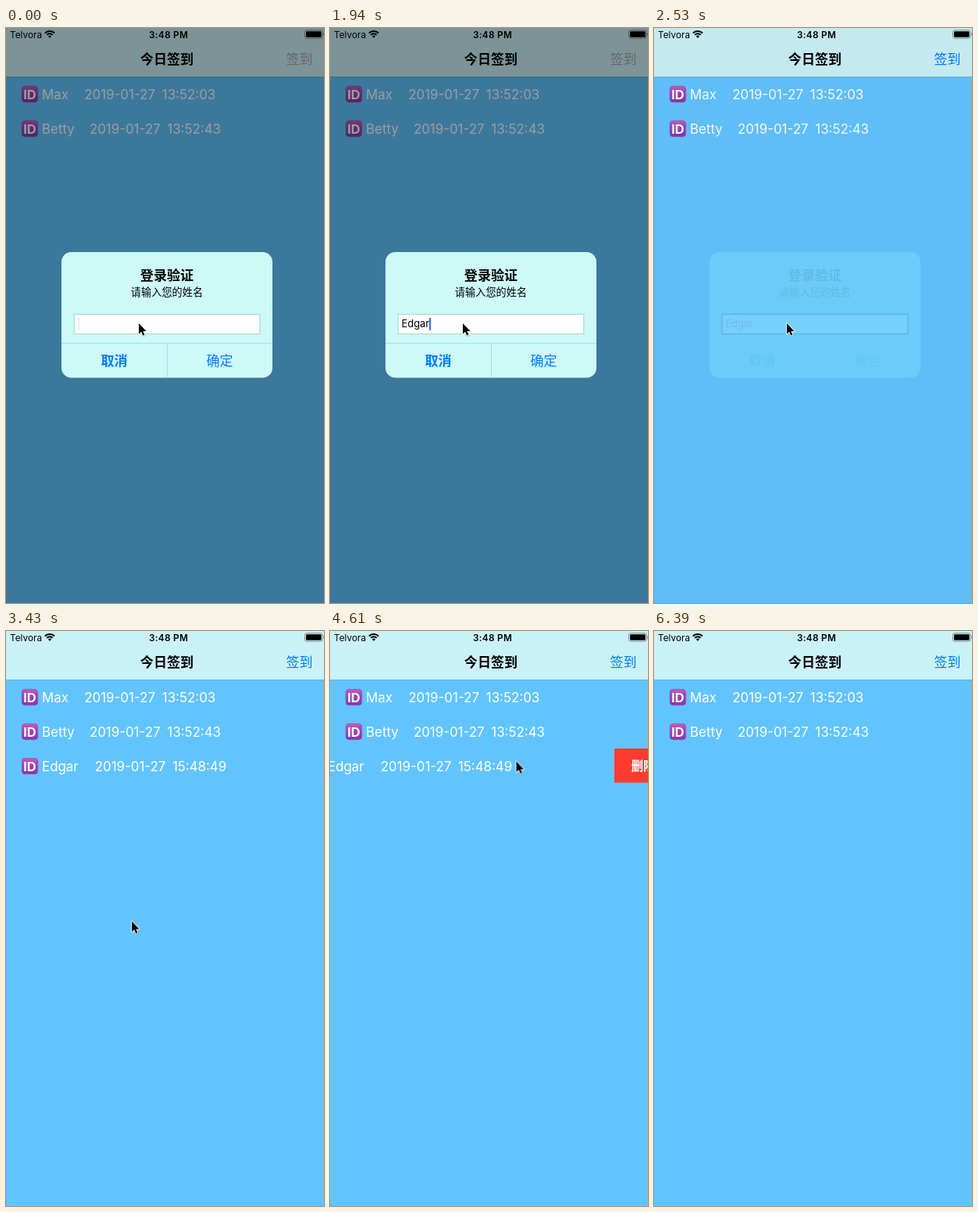
Recreate the animation shown at these times as an HTML page. Size 407x734 px, loop 7560 ms.

```html
<!DOCTYPE html>
<html lang="zh-CN">
<head>
<meta charset="utf-8">
<title>今日签到</title>
<style>
  html, body { margin: 0; width: 100%; height: 100%; overflow: hidden; background: #62c4ff; }
  .stage { position: relative; width: 407px; height: 734px; overflow: hidden; }
  .stage > * { position: absolute; left: 0; top: 0; }
  svg { display: block; width: 407px; height: 734px; }
  text { font: 400 17px Inter, "Noto Sans CJK SC", sans-serif; }
  .bold { font-weight: 600; }
  .mid { text-anchor: middle; }
  .cjk { font-family: "Noto Sans CJK SC", sans-serif; letter-spacing: .1px; }
  .rows text { font-size: 16.9px; fill: #fff; }
  .status { font-size: 11.8px; }
  .tag { font-size: 16.5px; font-weight: 700; fill: #fff; }
  .rows .del { font-size: 15.5px; font-weight: 600; letter-spacing: 0; }

  .anim { animation: 7560ms step-end infinite; }
  .sign { animation-name: sign; }
  .dim { width: 407px; height: 734px; background: #000; animation-name: dim; }
  .card { animation-name: card; }
  .body { animation-name: body; }
  .frame { animation-name: frame; }
  .entry { animation-name: entry; }
  .slide { animation-name: slide; }
  .button { animation-name: button; }
  .mouse { animation-name: mouse; }

  .field {
    left: 91.5px; top: 365px; height: 26px;
    display: flex; align-items: center;
    font: 12.9px/16px Inter, sans-serif; color: #000;
    animation-name: body;
  }
  .field span { font-size: 0; animation: type 7560ms step-end infinite; animation-delay: var(--at); }
  .caret { width: 2px; height: 16px; background: #4268f0; animation-name: caret; }

  @keyframes type { 0% { font-size: 12.9px } 50%, 100% { font-size: 0 } }
  @keyframes caret {
    0% { opacity: .1 } 1.851% { opacity: 0 } 5.82% { opacity: 1 } 31.481%, 100% { opacity: 0 }
  }
  @keyframes sign { 0% { fill: #a8a8a8 } 31.481%, 100% { fill: #007aff } }
  @keyframes dim {
    0% { opacity: .39 } 31.481% { opacity: .32 } 33.465% { opacity: .03 } 35.449%, 100% { opacity: 0 }
  }
  @keyframes card {
    0% { fill: #cdf9f7 } 31.481% { fill: #b5fbf8 } 33.465% { fill: #6ccbf9 } 35.449%, 100% { fill: transparent }
  }
  @keyframes body {
    0% { opacity: 1 } 31.481% { opacity: .85 } 33.465% { opacity: .08 } 35.449%, 100% { opacity: 0 }
  }
  @keyframes frame {
    0% { stroke: #a3cfd2 } 31.481% { stroke: #92d3dc } 33.465% { stroke: #50b0e8 } 35.449%, 100% { stroke: transparent }
  }
  @keyframes entry {
    0% { opacity: 0 } 39.417% { opacity: .5 } 41.402% { opacity: 1 }
    70.767% { opacity: .6 } 72.751% { opacity: .12 } 74.735%, 100% { opacity: 0 }
  }
  @keyframes slide {
    0% { transform: none } 60.978% { transform: translateX(-49px) } 62.962%, 100% { transform: translateX(-73px) }
  }
  @keyframes button {
    0% { transform: translateX(407px) } 60.978% { transform: translateX(364px) }
    62.962%, 100% { transform: translateX(334px) }
  }
  @keyframes mouse {
    0% { transform: translate(170px, 377px) }
    45.37% { transform: translate(161px, 370.5px) }
    47.222% { transform: translate(168px, 350px) }
    49.206% { transform: translate(190px, 308px) }
    51.19% { transform: translate(222px, 258px) }
    53.174% { transform: translate(258px, 214px) }
    55.158% { transform: translate(290px, 185px) }
    57.01% { transform: translate(312px, 170px) }
    58.994% { transform: translate(319px, 167px) }
    60.978% { transform: translate(238.5px, 166.5px) }
    62.962% { transform: translate(220px, 167px) }
    64.946% { transform: translate(272px, 170px) }
    66.931% { transform: translate(342px, 174px) }
    68.915% { transform: translate(376px, 175px) }
    82.539% { transform: translate(390px, 260px) }
    84.523%, 100% { transform: translate(420px, 300px) }
  }
</style>
</head>
<body>
<div class="stage">
  <svg viewBox="0 0 407 734">
    <defs>
      <linearGradient id="violet" x2="0" y2="1">
        <stop stop-color="#c45fbe"/><stop offset=".35" stop-color="#a544b4"/><stop offset="1" stop-color="#8438aa"/>
      </linearGradient>
      <g id="badge">
        <rect x="20.3" y="74.3" width="20.4" height="20.4" rx="4" fill="url(#violet)" stroke="#8a4cab" stroke-width=".6"/>
        <text class="tag mid" x="30.5" y="90.5">ID</text>
      </g>
    </defs>
    <rect width="407" height="734" fill="#62c4ff"/>
    <rect width="407" height="62" fill="#caf1f7"/>
    <rect y="62" width="407" height="1" fill="#6fb0cc"/>

    <text class="status" x="5" y="12.5">Telvora</text>
    <g fill="none" stroke="#000" stroke-width="2">
      <path d="M49.9 6.5a8.6 8.6 0 0 1 12.2 0M52.3 8.9a5.2 5.2 0 0 1 7.4 0"/>
      <path d="M56 12.8l-2.1-2.1a2.9 2.9 0 0 1 4.2 0z" fill="#000" stroke="none"/>
    </g>
    <text class="status bold mid" x="208" y="12.5" letter-spacing=".3">3:48 PM</text>
    <rect x="382.5" y="2.8" width="22.6" height="10.4" rx="2.6" fill="none" stroke="#000" stroke-opacity=".45" stroke-width=".9"/>
    <rect x="384" y="4.2" width="19.6" height="7.6" rx="1.4"/>
    <path d="M406 6.2q1.5 1.8 0 3.6z" fill-opacity=".5"/>

    <text class="cjk bold mid" x="206" y="46.3">今日签到</text>
    <text class="cjk mid sign anim" x="375.5" y="46.3">签到</text>

    <g class="rows">
      <use href="#badge"/>
      <text x="46" y="90.5">Max</text>
      <text x="100.3" y="90.5">2019-01-27</text>
      <text x="199.8" y="90.5">13:52:03</text>

      <use href="#badge" y="44"/>
      <text x="46" y="134.5">Betty</text>
      <text x="106.9" y="134.5">2019-01-27</text>
      <text x="206.3" y="134.5">13:52:43</text>

      <g class="entry anim">
        <g class="slide anim">
          <use href="#badge" y="88"/>
          <text x="46" y="178.5">Edgar</text>
          <text x="113.7" y="178.5">2019-01-27</text>
          <text x="212.9" y="178.5">15:48:49</text>
        </g>
        <g class="button anim">
          <rect y="150" width="73" height="43.5" fill="#ff3b30"/>
          <text class="cjk del" x="21.5" y="177.8">删除</text>
        </g>
      </g>
    </g>
  </svg>

  <div class="dim anim"></div>

  <svg viewBox="0 0 407 734">
    <rect class="card anim" x="71" y="286" width="270" height="160.5" rx="12.5"/>
    <g class="body anim">
      <rect x="87" y="365" width="238" height="26" fill="#fff"/>
      <path d="M71 402.5H341M206.5 402.5V446.5" stroke="#86eff0" fill="none"/>
      <text class="cjk bold mid" x="206" y="322">登录验证</text>
      <text class="cjk mid" x="206" y="342" style="font-size:13.1px">请输入您的姓名</text>
      <g fill="#007aff">
        <text class="cjk bold mid" x="138.5" y="431.3">取消</text>
        <text class="cjk mid" x="273.5" y="431.3">确定</text>
      </g>
    </g>
    <rect class="frame anim" x="87.2" y="365.4" width="237.6" height="25.2" fill="none"/>
  </svg>

  <div class="field anim">
    <span style="--at:440ms">E</span>
    <span style="--at:590ms">d</span>
    <span style="--at:1190ms">g</span>
    <span style="--at:1790ms">a</span>
    <span style="--at:1940ms">r</span>
    <i class="caret anim"></i>
  </div>

  <svg viewBox="0 0 407 734">
    <g class="mouse anim">
      <ellipse cx="6" cy="15.6" rx="3" ry="1.2" fill-opacity=".2"/>
      <path d="M0 0V13.6L3.1 10.8L5.2 15.6L7.4 14.6L5.3 9.9H9.6Z" stroke="#fff" stroke-width="1.6" stroke-linejoin="round" paint-order="stroke"/>
    </g>
  </svg>
</div>
</body>
</html>
```
